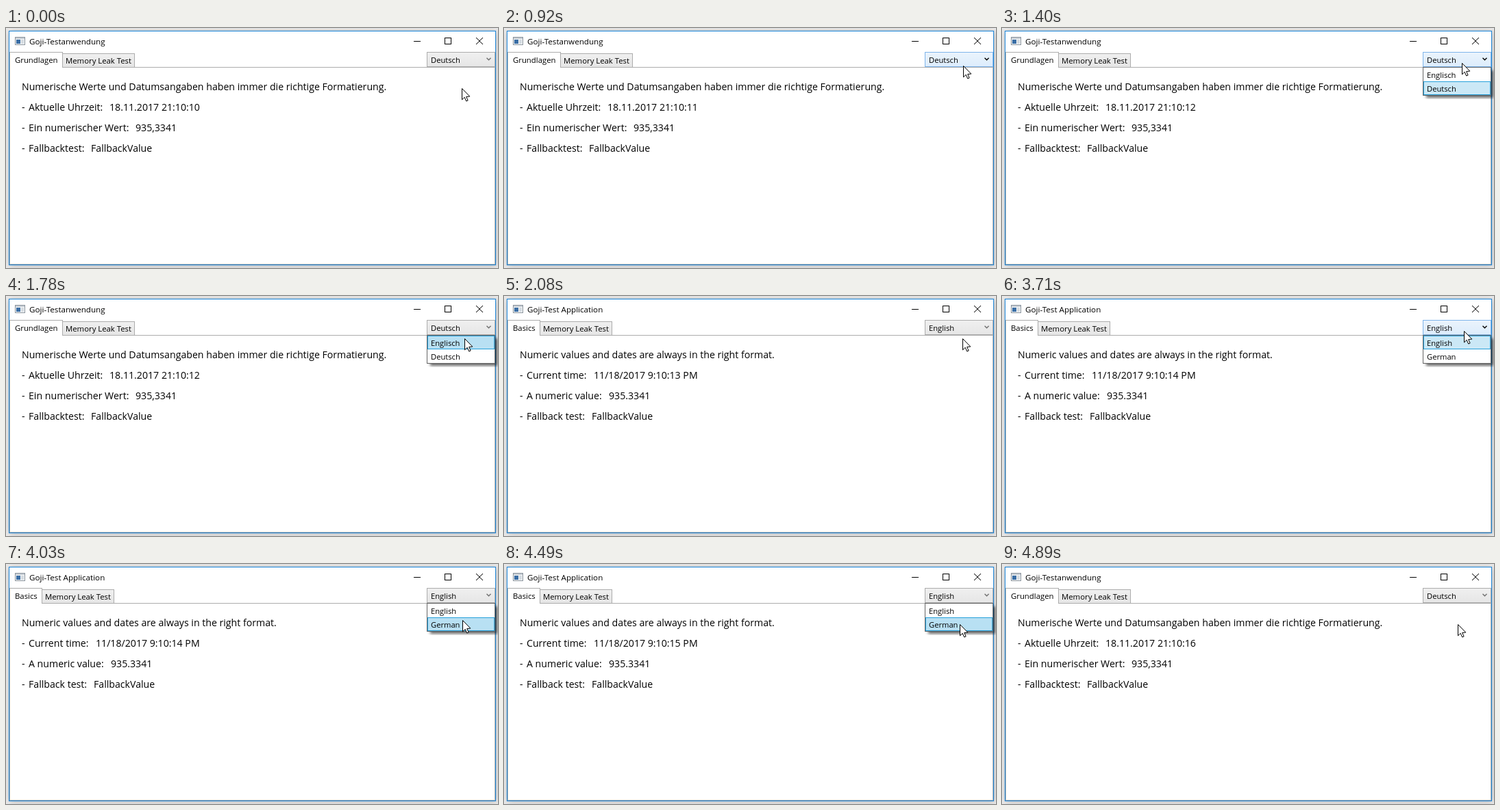
These frames come from a looping animation (718 by 351 pixels, 5.12 s). An HTML page with a canvas:

```html
<!DOCTYPE html>
<html lang="de">
<head>
<meta charset="utf-8">
<title>Goji-Testanwendung</title>
<style>
html, body { margin: 0; width: 100%; height: 100%; overflow: hidden; }
canvas { display: block; }
</style>
</head>
<body>
<canvas id="stage" width="718" height="351"></canvas>
<script>
const ctx = document.getElementById('stage').getContext('2d');
const LOOP = 5120;
const STEP = 75;
const TO_ENGLISH = 2080;
const TO_GERMAN = 4890;

const font = size => `${size}px "Open Sans", "Noto Sans", sans-serif`;
const TITLE_FONT = font(11.65);
const TAB_FONT = font(11.35);
const LIST_FONT = font(11.2);
const BODY_FONT = font(14.15);

const german = {
  title: 'Goji-Testanwendung',
  tab: 'Grundlagen', tabEdge: 82,
  intro: 'Numerische Werte und Datumsangaben haben immer die richtige Formatierung.',
  labels: ['Aktuelle Uhrzeit:', 'Ein numerischer Wert:', 'Fallbacktest:'],
  number: '935,3341',
  clock: s => `18.11.2017 21:10:${s}`,
  current: 'Deutsch', options: ['Englisch', 'Deutsch']
};
const english = {
  title: 'Goji-Test Application',
  tab: 'Basics', tabEdge: 52,
  intro: 'Numeric values and dates are always in the right format.',
  labels: ['Current time:', 'A numeric value:', 'Fallback test:'],
  number: '935.3341',
  clock: s => `11/18/2017 9:10:${s} PM`,
  current: 'English', options: ['English', 'German']
};

const rest = { x: 665, y: 88 };
const moves = [
  { start: 840, steps: 3, x: 671, y: 51 },
  { start: 1620, steps: 1, x: 669, y: 62 },
  { start: 3170, steps: 2, x: 674, y: 51 },
  { start: 3880, steps: 5, ...rest }
];

// Progress from 0 to 1 in equal jumps, the first one at the start time.
function stepped(t, start, steps) {
  if (t < start) return 0;
  return Math.min(1, (Math.floor((t - start) / STEP) + 1) / steps);
}

function pointerAt(t) {
  return moves.reduce((from, move) => {
    const p = stepped(t, move.start, move.steps);
    const eased = 1 - (1 - p) ** 2;
    return {
      x: from.x + (move.x - from.x) * eased,
      y: from.y + (move.y - from.y) * eased
    };
  }, rest);
}

// The clock text refreshes every second and on each language change.
function secondAt(t) {
  const timer = Math.floor((t - 230) / 1000) * 1000 + 230;
  const switched = [TO_ENGLISH, TO_GERMAN].filter(time => time <= t);
  return 10 + Math.floor((Math.max(timer, ...switched) + 1150) / 1000);
}

function popupAt(t) {
  if (t >= TO_GERMAN) return 0;
  return t < TO_ENGLISH ? stepped(t, 1230, 3) : stepped(t, 3560, 3);
}

function rect(x, y, w, h, fill) {
  ctx.fillStyle = fill;
  ctx.fillRect(x, y, w, h);
}

function box(x, y, w, h, fill, line) {
  if (fill) rect(x, y, w, h, fill);
  ctx.strokeStyle = line;
  ctx.lineWidth = 1;
  ctx.strokeRect(x + 0.5, y + 0.5, w - 1, h - 1);
}

function shadowRect(x, y, w, h, blur, offset, color) {
  ctx.save();
  ctx.shadowColor = color;
  ctx.shadowBlur = blur;
  ctx.shadowOffsetX = ctx.shadowOffsetY = offset;
  rect(x, y, w, h, '#fff');
  ctx.restore();
}

function text(str, x, y, face) {
  ctx.font = face;
  ctx.fillStyle = '#000';
  ctx.fillText(str, x, y);
}

function path(points, line, width = 1) {
  ctx.beginPath();
  points.forEach(([x, y]) => ctx.lineTo(x, y));
  ctx.strokeStyle = line;
  ctx.lineWidth = width;
  ctx.stroke();
}

function fade(y0, y1, from, to) {
  const g = ctx.createLinearGradient(0, y0, 0, y1);
  g.addColorStop(0, from);
  g.addColorStop(1, to);
  return g;
}

function drawWindow(lang) {
  rect(0, 0, 718, 351, '#ececec');
  shadowRect(4, 4, 711, 343, 9, 1, 'rgba(0,0,0,.24)');
  box(4, 4, 711, 343, '#fff', '#1883d7');

  box(13, 13, 15, 12, '#f4f6f8', '#8c959e');
  rect(14, 14, 13, 2, '#c5ccd3');
  rect(15, 17, 6, 6, '#3b6ea5');
  rect(22, 17, 4, 6, '#d5dbe1');
  text(lang.title, 34, 24, TITLE_FONT);

  rect(595, 19, 10, 1, '#000');
  box(640, 14, 10, 10, null, '#000');
  path([[686, 14], [696, 24]], '#000');
  path([[696, 14], [686, 24]], '#000');
}

function drawTabs(lang) {
  const edge = lang.tabEdge;
  box(5, 57, 709, 289, '#fff', '#acacac');
  box(edge, 37, 106, 21, fade(37, 57, '#f0f0f0', '#e5e5e5'), '#acacac');
  box(5, 35, edge - 4, 23, '#fff', '#acacac');
  rect(6, 57, edge - 6, 1, '#fff');
  text(lang.tab, 13, 51, TAB_FONT);
  text('Memory Leak Test', edge + 5, 52, TAB_FONT);
}

function drawBody(lang, second) {
  const values = [lang.clock(second), lang.number, 'FallbackValue'];
  text(lang.intro, 23, 91, BODY_FONT);
  lang.labels.forEach((label, i) => {
    const y = 121 + 30 * i;
    text('-', 23, y, BODY_FONT);
    text(label, 33, y, BODY_FONT);
    text(values[i], Math.round(43 + ctx.measureText(label).width), y, BODY_FONT);
  });
}

function drawCombo(lang, hover) {
  const fill = hover ? fade(35, 57, '#ebf4fc', '#dcecfc') : fade(35, 57, '#f0f0f0', '#e5e5e5');
  box(614, 35, 100, 22, fill, hover ? '#7eb4ea' : '#acacac');
  text(lang.current, 620, 51, LIST_FONT);
  path([[701.5, 43.8], [704.5, 46.8], [707.5, 43.8]], hover ? '#000' : '#707070', 1.4);
}

function drawPopup(lang, open, y) {
  if (!open) return;
  const hovered = y < 58 ? -1 : y < 78 ? 0 : 1;
  const active = hovered < 0 ? lang.options.indexOf(lang.current) : hovered;
  ctx.save();
  ctx.beginPath();
  ctx.rect(614, 57, 104, 47);
  ctx.clip();
  ctx.translate(0, Math.round((open - 1) * 42));
  shadowRect(616, 59, 98, 40, 4, 3, 'rgba(0,0,0,.6)');
  box(614, 57, 100, 42, '#fff', '#646464');
  lang.options.forEach((name, i) => {
    const top = 58 + 20 * i;
    if (i === active) box(615, top, 98, 20, hovered < 0 ? '#cbe8f6' : '#b8e0f3', '#26a0da');
    text(name, 620, top + 15, LIST_FONT);
  });
  ctx.restore();
}

function drawPointer(x, y) {
  const arrow = [[0, 0], [0, 16.4], [3.7, 12.8], [6.2, 18.5], [8.6, 17.5], [6.2, 12], [11.3, 11.6]];
  ctx.save();
  ctx.translate(Math.round(x) + 0.5, Math.round(y) + 0.5);
  ctx.beginPath();
  arrow.forEach(([dx, dy]) => ctx.lineTo(dx, dy));
  ctx.closePath();
  ctx.fillStyle = '#fff';
  ctx.fill();
  ctx.strokeStyle = '#000';
  ctx.lineWidth = 1;
  ctx.stroke();
  ctx.restore();
}

function draw(t) {
  const lang = t >= TO_ENGLISH && t < TO_GERMAN ? english : german;
  const { x, y } = pointerAt(t);
  drawWindow(lang);
  drawTabs(lang);
  drawBody(lang, secondAt(t));
  drawCombo(lang, y < 57);
  drawPopup(lang, popupAt(t), y);
  drawPointer(x, y);
}

const start = performance.now();
function tick() {
  draw((performance.now() - start) % LOOP);
  requestAnimationFrame(tick);
}
tick();
</script>
</body>
</html>
```
